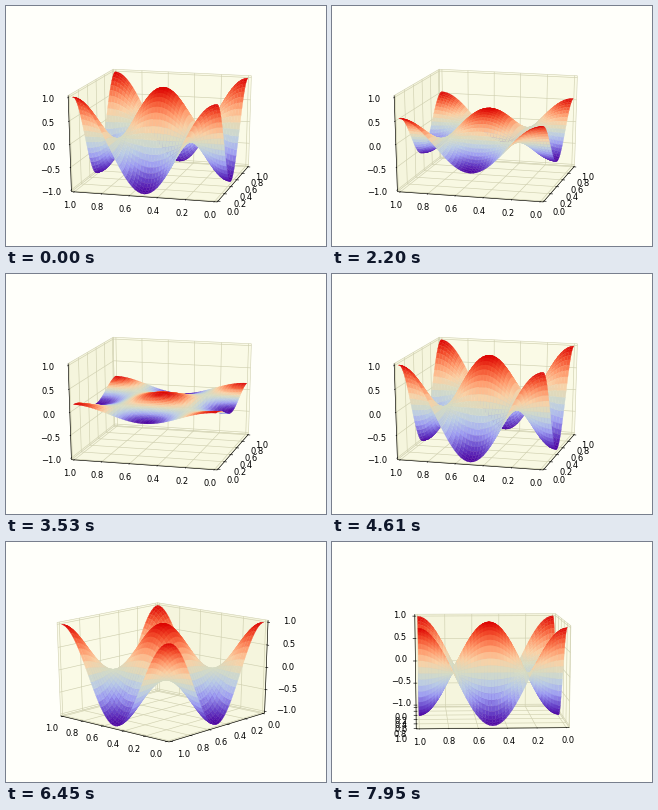
A matplotlib script that plays this animation: 320 by 240 pixels, repeating every 8 s.

```python
import itertools

import matplotlib.pyplot as plt
import numpy as np
from matplotlib.animation import FuncAnimation
from matplotlib.collections import LineCollection, PolyCollection
from matplotlib.colors import LinearSegmentedColormap

W, H, DPI = 320, 240, 50
LOOP, STEP = 8000, 40

CENTER = np.array([157.0, 126.7])    # screen position of the box centre
SCALE = np.array([141.0, 94.6])      # pixels per box side
DIST = 10.0                          # eye distance in box sides
EDGE = 25 / 48                       # half side of the box, with margin
LABEL_GAP = 0.11
TICK_OUT, TICK_IN = 0.017, 0.008

BACK = "#fffffa"
PANES = ["#fafae6", "#f5f5dd", "#f8f8e2"]
GRID = "#d0d0b0"
CMAP = LinearSegmentedColormap.from_list("wave", [
    "#4b00a0", "#6a48cc", "#9d9cf2", "#b9cbe6", "#d6dcc4",
    "#fbd0a4", "#ff9a6c", "#f4512e", "#dc0000"])

# Camera path: time in ms, azimuth and elevation in degrees
PATH_T = [5550, 5970, 6200, 6350, 6450, 7020]
PATH_AZIM = [195, 160, 142, 133, 131.7, 87]
PATH_ELEV = [19, 24, 27, 21, 19, 10]

# The membrane swings through one cycle
SWING_START, SWING_END = 1860, 4000

N = 44
side = np.linspace(0, 1, N + 1)
X, Y = np.meshgrid(side, side, indexing="ij")
MODE = np.cos(2 * np.pi * X) * np.cos(2 * np.pi * Y)


def quads(a):
    """Corner values of every grid cell, shape (cells, 4, ...)."""
    cells = np.stack([a[:-1, :-1], a[1:, :-1], a[1:, 1:], a[:-1, 1:]], axis=2)
    return cells.reshape((N * N, 4) + a.shape[2:])


CELL_MODE = quads(MODE).mean(axis=1)

TICKS = [
    [(v - 0.5, f"{v:.1f}") for v in np.linspace(0, 1, 6)],
    [(v - 0.5, f"{v:.1f}") for v in np.linspace(0, 1, 6)],
    [(v / 2, f"{v:.1f}".replace("-", "\u2212")) for v in np.linspace(-1, 1, 5)],
]


class Camera:
    def __init__(self, azim, elev):
        a, e = np.radians([azim, elev])
        self.sin_a, self.cos_a = np.sin(a), np.cos(a)
        self.sin_e, self.cos_e = np.sin(e), np.cos(e)

    def project(self, points):
        """Screen positions and nearness of points in the centred box."""
        x, y, z = np.moveaxis(np.asarray(points, float), -1, 0)
        right = -x * self.sin_a + y * self.cos_a
        toward = x * self.cos_a + y * self.sin_a
        down = toward * self.sin_e - z * self.cos_e
        near = toward * self.cos_e + z * self.sin_e
        zoom = 1 / (1 - near / DIST)
        flat = np.stack([right * zoom, down * zoom], axis=-1)
        return CENTER + SCALE * flat, near

    def far_sides(self):
        return np.array([-np.sign(self.cos_a), -np.sign(self.sin_a), -1]) * EDGE


def point(axis, value, base):
    p = np.array(base, float)
    p[axis] = value
    return p


def pane(axis, far):
    others = [k for k in range(3) if k != axis]
    corners = []
    for a, b in [(-1, -1), (1, -1), (1, 1), (-1, 1)]:
        p = np.array(far, float)
        p[others] = a * EDGE, b * EDGE
        corners.append(p)
    return corners


def axis_bases(far):
    """A point on the edge that carries each axis."""
    x, y, z = far
    return [(0, -y, z), (-x, 0, z), (-x, y, 0)]


def grid_line(axis, value, far):
    first, second = [k for k in range(3) if k != axis]
    corner = point(axis, value, far)
    return [point(first, -far[first], corner), corner,
            point(second, -far[second], corner)]


fig = plt.figure(figsize=(W / DPI, H / DPI), dpi=DPI, facecolor=BACK)
ax = fig.add_axes([0, 0, 1, 1])
ax.set(xlim=(0, W), ylim=(H, 0))
ax.axis("off")

panes = PolyCollection([], facecolors=PANES, edgecolors=GRID,
                       linewidths=0.8, zorder=1)
grid = LineCollection([], colors=GRID, linewidths=0.9, zorder=2)
axes_lines = LineCollection([], colors="black", linewidths=0.9, zorder=3)
surface = PolyCollection([], linewidths=0.4, zorder=4)
for item in (panes, grid, axes_lines, surface):
    ax.add_collection(item, autolim=False)

labels = [[ax.text(0, 0, text, fontsize=12, family="DejaVu Sans",
                   ha="center", va="center", zorder=5)
           for _, text in ticks] for ticks in TICKS]


def draw_box(cam):
    far = cam.far_sides()
    panes.set_verts([cam.project(pane(k, far))[0] for k in range(3)])
    grid.set_segments([cam.project(grid_line(k, v, far))[0]
                       for k in range(3) for v, _ in TICKS[k]])

    lines = []
    for k, base in enumerate(axis_bases(far)):
        base = np.array(base, float)
        out = np.sign(base)
        tick_dir = out * np.eye(3)[1 if k == 0 else 0]
        lines.append([point(k, -EDGE, base), point(k, EDGE, base)])
        for (value, _), label in zip(TICKS[k], labels[k]):
            p = point(k, value, base)
            lines.append([p - TICK_IN * tick_dir, p + TICK_OUT * tick_dir])
            label.set_position(cam.project(p + LABEL_GAP * out)[0])
    axes_lines.set_segments(cam.project(lines)[0])


def draw_surface(cam, height):
    points = np.stack([X - 0.5, Y - 0.5, MODE * height / 2], axis=-1)
    flat, near = cam.project(points)
    order = np.argsort(quads(near).mean(axis=1))
    sign = 1 if height >= 0 else -1
    colors = CMAP((1 + sign * CELL_MODE[order]) / 2)
    surface.set_verts(quads(flat)[order])
    surface.set_facecolor(colors)
    surface.set_edgecolor(colors)


def update(i):
    t = i * STEP
    cam = Camera(np.interp(t, PATH_T, PATH_AZIM),
                 np.interp(t, PATH_T, PATH_ELEV))
    phase = np.interp(t, [SWING_START, SWING_END], [0, 2 * np.pi])
    draw_box(cam)
    draw_surface(cam, np.cos(phase))
    return [panes, grid, axes_lines, surface, *itertools.chain(*labels)]


anim = FuncAnimation(fig, update, frames=LOOP // STEP, interval=STEP,
                     init_func=lambda: update(0), repeat=True, repeat_delay=0)
plt.show()
```
